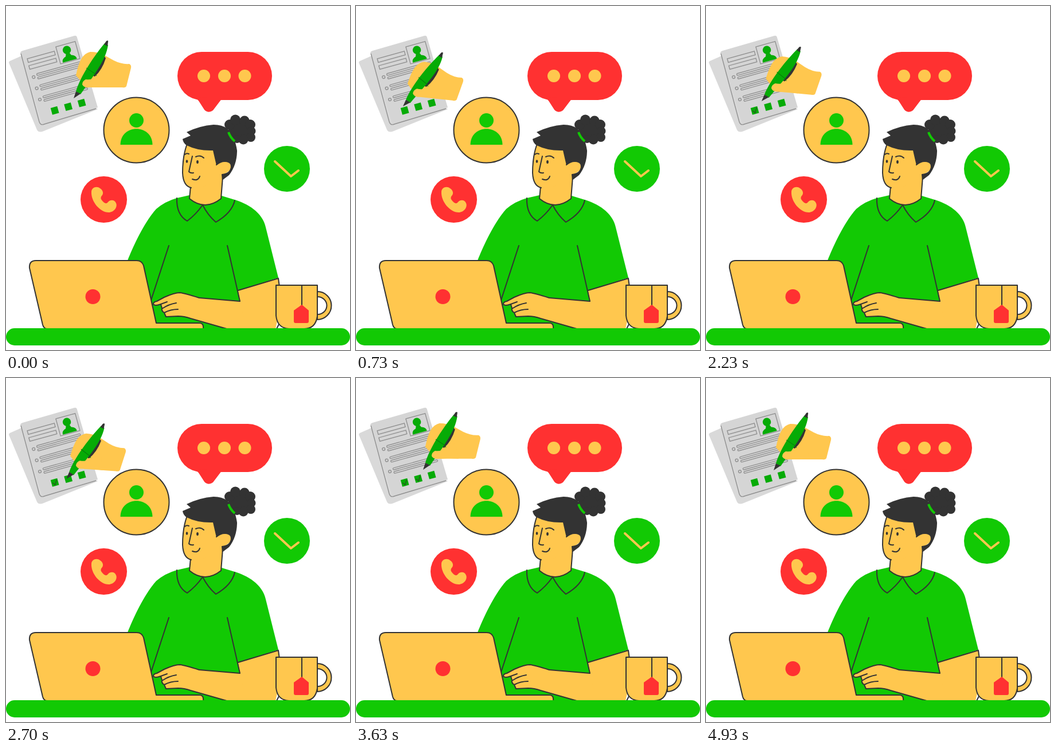
Animation of 600x600 px, one loop 5.01 s. Source, as an HTML page:

```html
<!DOCTYPE html>
<html lang="en">
<head>
<meta charset="utf-8">
<title>Working at the desk</title>
<style>
html, body { margin: 0; width: 100%; height: 100%; overflow: hidden; background: #fff; }
svg { display: block; width: 100vw; height: 100vh; }
.g { fill: #12c904; }
.y { fill: #ffc74e; }
.r { fill: #ff3131; }
.k { fill: #333; }
.o { stroke: #333; stroke-width: 2; stroke-linejoin: round; stroke-linecap: round; }
.l { fill: none; }
.p { fill: none; stroke: #919191; stroke-width: 1.4; }
.d { fill: #06ab06; }
.tick { fill: none; stroke: #245c1e; stroke-width: 1.5; visibility: hidden; }
</style>
</head>
<body>
<svg viewBox="0 0 600 600">
  <!-- papers -->
  <path fill="#d9d9d9" d="M5 99 Q5 96 9 95 L27 87 L160 180 L66 218 Q57 222 54 216Z"/>
  <path fill="#d5d5d5" d="M25 82 Q25 79 29 78 L119 52 Q123 51 124 55 L160 177 L64 207Z"/>
  <path class="p" d="M26 83 L58 202 Q60 209 67 206 L157 179"/>
  <g id="sheet" transform="translate(25 80) rotate(-15.5)">
    <rect class="p" x="8.4" y="14.8" width="49" height="6.6"/>
    <rect class="p" x="7.8" y="27.2" width="49" height="6.6"/>
    <rect class="p" x="62" y="8" width="35" height="31"/>
    <circle class="d" cx="79" cy="18.6" r="7.2"/>
    <path class="d" d="M66.500 38 Q66 31 74 29 L76 24 H82 L84 29 Q92 31 92 38Z"/>
  </g>

  <!-- writing hand -->
  <g id="hand">
    <path class="y" d="M122 121 Q126 101 132 91 Q138 82 147 80 Q160 80 170 85 L188 95 Q202 102 215 101 Q219 103 218 108 L210 140 Q208 143 203 142 L160 142 H148 L128 128Z"/>
    <path class="k" d="M152 122 L171 87 L174 91 Q168 111 155 123Z"/>
    <path class="d" d="M122 149 C128 128 148 94 172 65 L178 68 C174 95 155 118 130 154Z"/>
    <path class="k" d="M118 161 L122 149 L130 153Z M171 67 L175 61 Q179 59 178 63 L177 70Z"/>
    <path d="M140 108 L155 118 L158 122" fill="none" stroke="#077a0b" stroke-width="1"/>
    <path class="y" d="M175 114 Q160 121 154 126 Q149 129 139 128 Q133 131 133 137 Q136 143 144 142 L160 141 L180 142Z"/>
  </g>

  <!-- badges -->
  <rect class="r" x="299" y="80" width="165" height="84" rx="42"/>
  <path class="r" d="M327 159 Q334 162 337 167 L346 181 Q353 188 361 182 L377 161Z"/>
  <g class="y"><circle cx="345" cy="122" r="11"/><circle cx="381" cy="122" r="11"/><circle cx="416.500" cy="122" r="11"/></g>
  <circle class="y o" cx="227.500" cy="216.500" r="57"/>
  <circle class="g" cx="227.500" cy="199.500" r="12.500"/>
  <path class="g" d="M199.500 242 C200 205 255 205 255.500 242Z"/>
  <circle class="r" cx="170.500" cy="337.500" r="40.500"/>
  <path class="y" d="M149 324 C149 317 158 313 164 318 C169 321 171 327 167 331 Q163 335 169 341 Q174 347 178 342 C182 337 190 338 192 344 C195 351 188 360 179 360 C164 360 148 341 149 324Z"/>
  <circle class="g" cx="490" cy="284" r="40"/>
  <path d="M469 271 L497 297 L510 287" fill="none" stroke="#ffc74e" stroke-width="4" stroke-linecap="round" stroke-linejoin="round"/>

  <!-- body -->
  <path class="g" d="M320 330 L298 335 Q277 341 262 354 C240 379 222 419 212 444 L245 563 H400 L409 516 L405 496 L475 474 L453 386 C448 360 420 344 399 338 L376 331Z"/>
  <path class="y" d="M405 496 L475 475 L480 520 L470 563 H385 L380 530 L408 515Z"/>
  <path class="y" d="M257 519 Q258 516 263 515 L276 508 Q294 500 303 500 Q312 501 337 509 L408 515 L420 563 H385 L322 545 Q311 541 300 541 L279 542 Q277 539 276 535 Q271 531 272 526 L270 520 L260 523 Q257 522 257 519Z"/>
  <path class="o l" d="M405 496 L475 475 L477 490 M386 418 L408 515 L337 509 Q312 501 303 500 Q294 500 276 508 L263 515 Q257 516 257 520 Q259 524 270 520 L272 527 Q271 532 276 535 L279 542 L300 541 Q311 541 322 545 L385 563 M270 520 L281 516 M272 528 Q284 520 297 518 M276 535 Q287 529 300 529 M284 418 L253 513 M472 563 L476 555"/>
  <path class="y" d="M322 310 L320 336 Q346 357 375 336 L378 295Z"/>
  <path class="o l" d="M322 314 L320 336 Q347 358 375 336 L378 298 M298 335 Q297 364 316 375 Q331 364 343 347 Q352 365 366 377 Q394 361 399 339"/>

  <!-- head -->
  <path class="y" d="M315 241 Q308 263 308 291 Q309 315 325 317 Q350 319 377 296 L393 285 L390 268 L365 240Z"/>
  <path class="o l" d="M315 243 Q308 263 308 291 Q309 314 323 317"/>
  <path class="k" d="M308 232 L322 226 L315 220 Q337 209 362 207 Q377 207 386 214 Q399 226 403 252 Q403 277 389 295 L377 304 L376 294 Q391 294 393 281 Q393 270 383 271 Q373 272 367 278 L361 252 Q335 253 315 243 Q309 239 308 232Z"/>
  <path class="o l" d="M367 277 Q375 270 383 271 Q394 272 393 281 Q391 293 377 294"/>
  <g class="k">
    <circle cx="408" cy="216" r="20"/><circle cx="390" cy="207" r="9"/><circle cx="400" cy="198.500" r="9"/>
    <circle cx="416" cy="200" r="8.500"/><circle cx="426" cy="207" r="9"/><circle cx="428" cy="218" r="7.500"/>
    <circle cx="427" cy="229" r="8"/><circle cx="414" cy="233" r="8.500"/><circle cx="403" cy="232" r="7"/>
    <ellipse cx="315.500" cy="271" rx="1.800" ry="2.800"/><ellipse cx="334" cy="272" rx="1.900" ry="2.900"/>
  </g>
  <path d="M388 220 Q391 229 399 236" fill="none" stroke="#12c904" stroke-width="4"/>
  <path class="o l" d="M312 259 Q315 256 319 258 M331 263 Q339 259 345 265 M325 262 L319 289 Q322 292 327 291 M325 302 Q335 306 338 297"/>

  <!-- desk things -->
  <path class="y o" d="M41 457 Q40 444 52 444 H228 Q237 444 240 453 L262 553 H339 Q345 554 344 563 H72 Q66 563 64 556Z"/>
  <circle class="r" cx="151.500" cy="507" r="13"/>
  <path class="y o" d="M543 498 A24.500 24.500 0 0 1 543 547 V538 A16.500 15.500 0 0 0 543 507Z"/>
  <path class="y o" d="M471 487 H543 V541 Q540 563 520 563 H494 Q473 562 471 540Z"/>
  <path class="o l" d="M516 488 V523"/>
  <path class="r" d="M516 521 L528 531 V550 Q528 553 525 553 H505 Q502 553 502 550 V531Z"/>
  <rect class="g" x="0" y="562" width="600" height="30" rx="15"/>
</svg>
<script>
const LOOP = 5010, LAST = 4930;
const sheet = document.getElementById('sheet');
const hand = document.getElementById('hand');
const ticks = [];

function add(tag, attrs) {
  const el = document.createElementNS('http://www.w3.org/2000/svg', tag);
  for (const k in attrs) el.setAttribute(k, attrs[k]);
  sheet.appendChild(el);
  return el;
}

for (let i = 0; i < 3; i++) {
  const y = 48.6 + 20.3 * i;
  add('circle', { class: 'p', cx: 10.6, cy: y, r: 2.4 });
  for (const dy of [-2.7, 3.7])
    add('rect', { class: 'p', x: 17, y: y + dy - 1.6, width: 79, height: 3.2, rx: 1.5 });
}
for (let i = 0; i < 3; i++) {
  const x = 30.6 + 24.4 * i;
  add('rect', { class: 'd', x: x - 6, y: 108.6, width: 12, height: 12 });
  if (i < 2) ticks.push(add('path', { class: 'tick', d: `M${x - 4} 114 l3.5 4.5 l5 -8` }));
}

// time, pen tip x, pen tip y, pen angle
const path = [
  [0, 118, 160, 59.2], [530, 94, 164, 56], [730, 82, 174, 53.4],
  [1030, 84, 179, 53.4], [1530, 89, 166, 54.9], [1850, 91, 160, 55.5],
  [2230, 97, 165, 54.1], [2600, 104, 175, 55], [3130, 111, 167, 57.1],
  [3330, 114, 162, 58], [3630, 117, 159, 59.4], [4230, 120, 164, 61.4],
  [4600, 119, 162, 60.2], [4930, 118, 160, 59.2]
];

function spline(t) {
  let i = 0;
  while (i < path.length - 2 && t >= path[i + 1][0]) i++;
  const b = path[i], c = path[i + 1];
  const a = path[i - 1] || b, d = path[i + 2] || c;
  const h = c[0] - b[0], u = (t - b[0]) / h;
  return [1, 2, 3].map(k => {
    const m = a === b ? 0 : (c[k] - a[k]) / (c[0] - a[0]) * h;
    const n = d === c ? 0 : (d[k] - b[k]) / (d[0] - b[0]) * h;
    const e = c[k] - b[k];
    return b[k] + u * (m + u * (3 * e - 2 * m - n + u * (m + n - 2 * e)));
  });
}

// the picture steps after alternately 30 and 70 ms
function step(t) {
  const r = t % 100;
  return Math.min(LAST, t - r + (r >= 30 ? 30 : 0));
}

function draw(now) {
  const t = step(now % LOOP);
  const [x, y, a] = spline(t);
  hand.setAttribute('transform', `translate(${x - 118} ${y - 160}) rotate(${59.2 - a} 118 160)`);
  ticks.forEach((el, i) => {
    el.style.visibility = t >= 1300 + 1600 * i && t < 4900 ? 'visible' : 'hidden';
  });
}

const start = performance.now();
function loop() {
  draw(performance.now() - start);
  requestAnimationFrame(loop);
}
loop();
</script>
</body>
</html>
```
